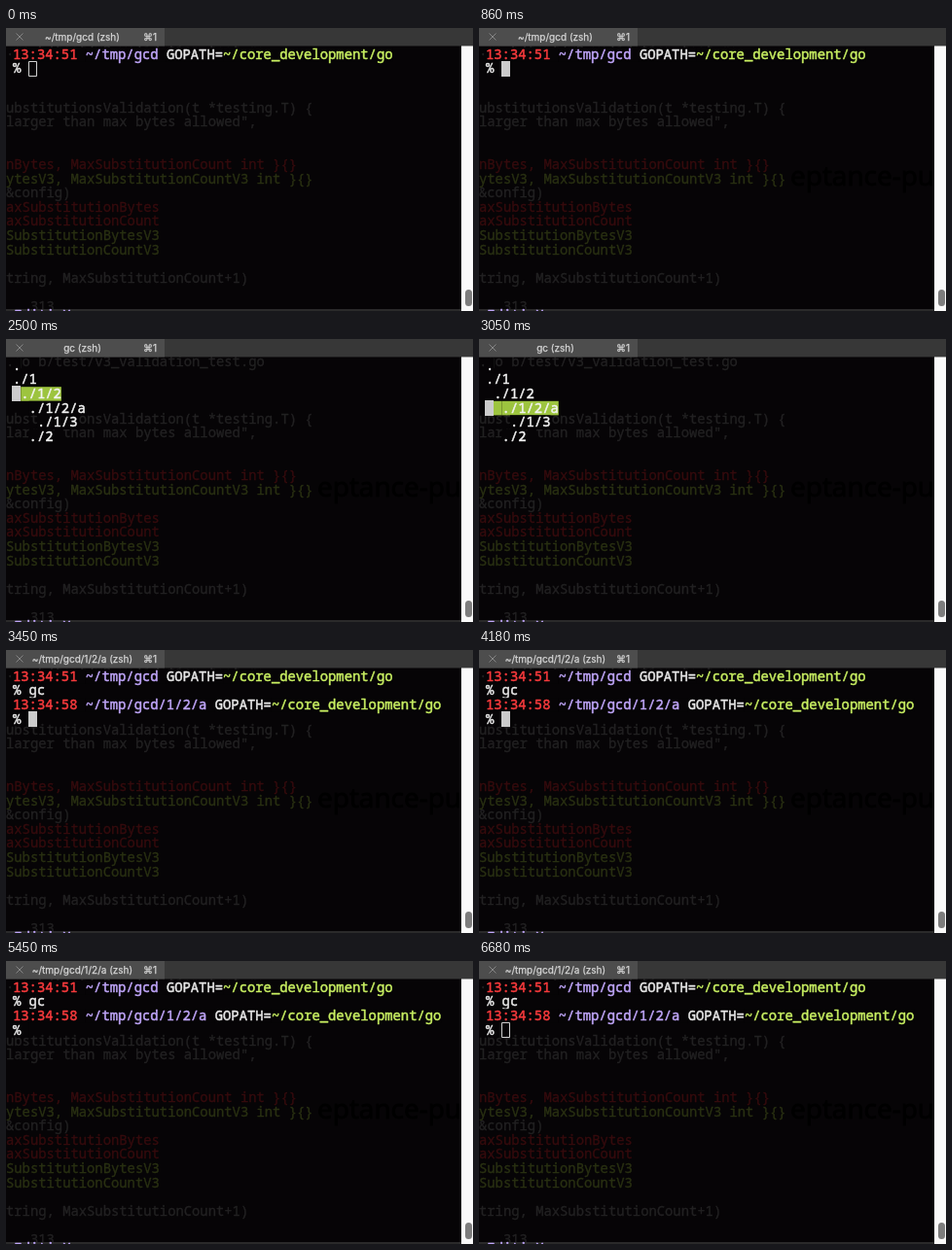
These frames come from a looping animation (480x291 px, 6720 ms). An HTML page with a canvas:

```html
<!DOCTYPE html>
<html lang="en">
<head>
<meta charset="utf-8">
<style>
html, body { margin: 0; width: 100%; height: 100%; overflow: hidden; background: #050404; }
canvas { display: block; width: 480px; height: 291px; }
</style>
</head>
<body>
<canvas id="stage"></canvas>
<script>
const LOOP = 6720;
const LEFT = 7, CELL = 8.31, ROW = 14.6, TOP = 20;
const MONO = '13.85px "Noto Sans Mono", "DejaVu Sans Mono", monospace';
const BACK = '#060406', GREEN = '#9dc43f';
const RED = '#f83a3c', VIOLET = '#c0a6fa', LIME = '#c9f062', WHITE = '#e8e8e8';
const DIM = '#222122', DIM_RED = '#350b0d', DIM_OLIVE = '#293012';

const canvas = document.getElementById('stage');
const ratio = window.devicePixelRatio || 1;
canvas.width = 480 * ratio;
canvas.height = 291 * ratio;
const ctx = canvas.getContext('2d');
ctx.scale(ratio, ratio);
ctx.lineJoin = 'round';

// Text showing through from the window behind: row, colour, text
const behind = [
  [-5, DIM, '.go b/test/v3_validation_test.go'],
  [-1, DIM, 'ubstitutionsValidation(t *testing.T) {'],
  [0, DIM, 'larger than max bytes allowed",'],
  [3, DIM_RED, 'nBytes, MaxSubstitutionCount int }{}'],
  [4, DIM_OLIVE, 'ytesV3, MaxSubstitutionCountV3 int }{}'],
  [5, DIM, '&config)'],
  [6, DIM_RED, 'axSubstitutionBytes'],
  [7, DIM_RED, 'axSubstitutionCount'],
  [8, DIM_OLIVE, 'SubstitutionBytesV3'],
  [9, DIM_OLIVE, 'SubstitutionCountV3'],
  [11, DIM, 'tring, MaxSubstitutionCount+1)'],
  [13, DIM, '   313']
];

// Directory list: indent in cells, path
const dirs = [[0, '.'], [0, './1'], [1, './1/2'], [2, './1/2/a'], [3, './1/3'], [2, './2']];

function box(x, y, w, h, color) {
  ctx.fillStyle = color;
  ctx.fillRect(x, y, w, h);
}

// A thin outline in the same colour gives a medium weight
function text(str, x, y, color, font, outline, align = 'left') {
  ctx.font = font;
  ctx.textAlign = align;
  ctx.fillStyle = ctx.strokeStyle = color;
  ctx.lineWidth = outline;
  ctx.fillText(str, x, y);
  ctx.strokeText(str, x, y);
}

const mono = (str, x, y, color, outline = .5) => text(str, x, y, color, MONO, outline);

// Terminal cells hide whatever shows through behind them
function cells(str, col, row, color, back = BACK) {
  const x = LEFT + col * CELL, y = TOP + row * ROW;
  box(x, y, str.length * CELL, ROW, back);
  mono(str, x, y + 11.7, color);
}

function prompt(row, time, path) {
  let col = 0;
  for (const [str, color] of [[time + ' ', RED], [path + ' ', VIOLET],
                              ['GOPATH=', WHITE], ['~/core_development/go', LIME]]) {
    cells(str, col, row, color);
    col += str.length;
  }
}

function cursor(col, row, style) {
  const x = Math.round(LEFT + col * CELL) - 1, y = Math.round(TOP + row * ROW) - 1;
  if (style === 'solid') box(x, y, 9, 16, '#cbcbcb');
  if (style === 'hollow') {
    ctx.strokeStyle = '#d0d0d0';
    ctx.lineWidth = 1;
    ctx.strokeRect(x + .5, y + .5, 8, 15);
  }
}

function backdrop(focused) {
  box(0, 0, 480, 291, BACK);
  if (focused) text('eptance-pu', 468, 162, '#000', '28px "Open Sans", sans-serif', .8, 'right');
  for (const [row, color, str] of behind) mono(str, 0, 101.2 + row * ROW, color, .35);
}

function chrome(title) {
  box(468, 18, 12, 273, '#fafafa');
  ctx.fillStyle = '#7d7d7d';
  ctx.beginPath();
  ctx.roundRect(472, 269, 7, 17, 3.5);
  ctx.fill();
  box(0, 289, 468, 2, '#2a2a2a');
  mono('.Editi X', 0, 300, VIOLET);

  box(0, 0, 480, 18.5, '#373737');
  box(0, 0, 163, 18.5, '#4d4d4d');
  ctx.strokeStyle = '#858585';
  ctx.lineWidth = 1;
  ctx.beginPath();
  ctx.moveTo(10.5, 5.5); ctx.lineTo(17.5, 12.5);
  ctx.moveTo(17.5, 5.5); ctx.lineTo(10.5, 12.5);
  ctx.stroke();
  const font = '10px Inter, "DejaVu Sans", sans-serif';
  text(title, 78.5, 12.7, '#d6d6d6', font, .25, 'center');
  text('⌘1', 155, 12.7, '#d6d6d6', font, .25, 'right');
}

function list(selected) {
  dirs.forEach(([indent, path], row) => {
    const on = row === selected;
    if (on) box(LEFT, TOP + row * ROW, indent * CELL, ROW, GREEN);
    cells(path, indent, row, '#f4f4f4', on ? GREEN : BACK);
  });
  cursor(0, selected, 'solid');
  if (selected < 2) mono('.', LEFT, TOP + selected * ROW + 11.7, '#fff');
}

function blink(t) {
  if (t >= 6500) return 'hollow';
  return Math.floor((t - 2850) / 660) % 2 ? 'none' : 'solid';
}

function draw(t) {
  backdrop(t >= 400);
  if (t < 1500) {
    const typed = t < 1000 ? '' : t < 1180 ? 'g' : 'gc';
    prompt(0, '13:34:51', '~/tmp/gcd');
    cells('% ' + typed, 0, 1, WHITE);
    cursor(2 + typed.length, 1, t < 400 ? 'hollow' : 'solid');
    chrome('~/tmp/gcd (zsh)');
  } else if (t < 3200) {
    list([2050, 2380, 2790].filter(step => t >= step).length);
    chrome('gc (zsh)');
  } else {
    prompt(0, '13:34:51', '~/tmp/gcd');
    cells('% gc', 0, 1, WHITE);
    prompt(2, '13:34:58', '~/tmp/gcd/1/2/a');
    cells('% ', 0, 3, WHITE);
    cursor(2, 3, blink(t));
    chrome('~/tmp/gcd/1/2/a (zsh)');
  }
}

const start = performance.now();
function tick() {
  draw((performance.now() - start) % LOOP);
  requestAnimationFrame(tick);
}
tick();
</script>
</body>
</html>
```
